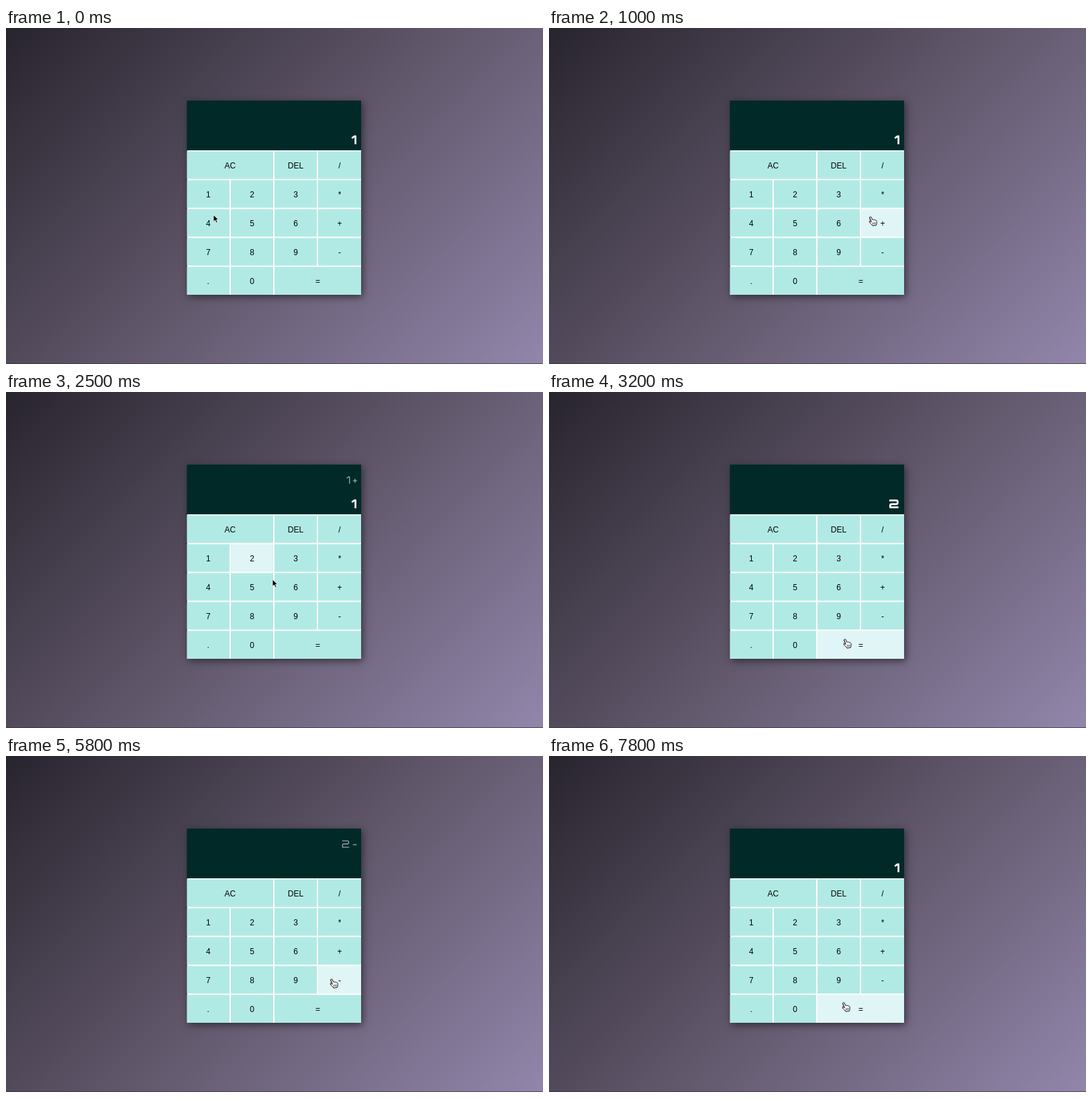
An HTML page that plays this animation: 800x500 px, repeating every 8 s.

```html
<!DOCTYPE html>
<html lang="en">
<head>
<meta charset="utf-8">
<title>Calculator</title>
<style>
  html, body { margin: 0; width: 100%; height: 100%; overflow: hidden; }
  body { background: linear-gradient(135deg, #28242e 0%, #5f5669 50%, #9286ab 100%); }
  svg { position: absolute; left: 0; top: 0; display: block; }
  .panel { position: absolute; left: 269.5px; top: 108px; width: 259.5px; height: 289px;
    background: #fff; box-shadow: 2px 3px 11px rgba(35, 31, 40, .8); }
  .floor { position: absolute; left: 0; top: 499px; width: 100%; height: 1px; background: rgba(55, 50, 60, .7); }
  text { font: 12px "Liberation Sans", Arial, sans-serif; text-anchor: middle; fill: #000; }
  .key { fill: #b1eae4; }
  .key.on { fill: #e0f5f6; }
  .glyph { fill: none; stroke-linejoin: round; }
  .big { stroke: #fff; stroke-width: 2.7; }
  .small { stroke: #b4c3c2; stroke-width: 1.1; }
</style>
</head>
<body>
<div class="panel"></div>
<div class="floor"></div>
<svg width="800" height="500" viewBox="0 0 800 500">
  <rect x="269.5" y="108" width="259.5" height="74" fill="#002927"/>
  <g id="keys"></g>
  <path id="prev" class="glyph small"/>
  <path id="sign" class="glyph small"/>
  <path id="curr" class="glyph big"/>
  <g id="arrow">
    <path d="M0 0V10.2L2.5 8L4.2 12L6.1 11.2L4.4 7.3H7.6Z" fill="#000" stroke="#fff" stroke-width=".8" stroke-linejoin="round"/>
  </g>
  <g id="hand" fill="#fff" stroke="#111" stroke-width="1" stroke-linejoin="round" stroke-linecap="round">
    <path d="M-1.3 1.2C-1.3-.4 .8-.6 1.3 .8L2.6 4.3C3.2 3.6 4.4 3.7 4.8 4.6C5.5 4 6.6 4.2 6.9 5.1C7.9 4.7 8.9 5.3 9 6.4C9.3 8.4 9.4 10.2 8.3 12.6L3 13.2C2.2 11.7 .2 10.2-1.3 8.3C-2.2 7.1-1-.1 .9 7.2Z"/>
    <path d="M-1.3 1.2L.9 7.2C-.5 6.2-2.2 6.7-1.4 8.2" fill="#fff"/>
    <path d="M3.4 8.7V11M5.2 8.6V10.9M7 8.4V10.8" stroke-width=".7"/>
  </g>
</svg>
<script>
const $ = id => document.getElementById(id);
const NS = "http://www.w3.org/2000/svg";
const LOOP = 8000, STEP = 100;

// Column and row edges of the key grid; lines between keys are 2px wide
const cols = [268.5, 334, 399, 464, 530];
const rows = [182.3, 225.5, 268.5, 311.5, 354.5, 398];
const layout = [
  [["AC", 2], ["DEL", 1], ["/", 1]],
  [["1", 1], ["2", 1], ["3", 1], ["*", 1]],
  [["4", 1], ["5", 1], ["6", 1], ["+", 1]],
  [["7", 1], ["8", 1], ["9", 1], ["-", 1]],
  [[".", 1], ["0", 1], ["=", 2]]
];

function add(tag, attrs) {
  const el = document.createElementNS(NS, tag);
  for (const k in attrs) el.setAttribute(k, attrs[k]);
  return $("keys").appendChild(el);
}

const keys = [];
layout.forEach((line, r) => {
  let c = 0;
  for (const [label, span] of line) {
    const x = cols[c] + 1, y = rows[r] + 1;
    const w = cols[c + span] - x - 1, h = rows[r + 1] - y - 1;
    const el = add("rect", { class: "key", x, y, width: w, height: h });
    add("text", { x: x + w / 2, y: y + h / 2 + 4.7 }).textContent = label;
    keys.push({ el, x, y, w, h });
    c += span;
  }
});

// Pointer path: time, x, y
const path = [
  [0, 309, 278], [800, 476, 280], [1000, 479, 281], [1300, 479, 281],
  [1800, 310, 246], [2200, 313, 248], [2400, 375, 264], [2500, 397, 279],
  [2800, 440, 367], [3300, 441, 368], [4000, 485, 289], [4200, 486, 290],
  [4600, 486, 291], [4900, 487, 360], [5200, 487, 360], [5400, 485, 332],
  [5900, 485, 332], [6600, 308, 246], [6900, 310, 248], [7000, 360, 275],
  [7100, 378, 285], [7500, 438, 365], [7800, 439, 367], [8000, 439, 367]
];

// Display: time, stored number, operator, entry
const states = [
  [0, "", "", "1"], [1200, "1", "+", ""], [2000, "1", "+", "1"],
  [3100, "", "", "2"], [4400, "2", "+", ""], [5600, "2", "-", ""],
  [6900, "2", "-", "1"], [7800, "", "", "1"]
];

const big = {
  "": "",
  "1": "M515.2 164L519.2 161.2H520.6V173",
  "2": "M507 161.4H517.2Q519.4 161.4 519.4 163.4V164.8Q519.4 166.8 517.2 166.8H510.4Q508.3 166.8 508.3 168.8V171.7H520.6"
};
const small = {
  "": "",
  "1": "M507.4 128.4L510.4 126.3H511.8V136.4",
  "2": "M500.8 126.3H508.7Q510.5 126.3 510.5 128V129.2Q510.5 130.9 508.7 130.9H503.1Q501.3 130.9 501.3 132.6V135.8H511.3"
};
const signs = { "": "", "+": "M516.8 132H523M519.9 128.9V135.1", "-": "M516.8 132H522.4" };

function pointAt(t) {
  const i = Math.max(1, path.findIndex(p => p[0] >= t));
  const [t0, x0, y0] = path[i - 1], [t1, x1, y1] = path[i];
  const u = (t - t0) / (t1 - t0), e = u * u * (3 - 2 * u);
  return [x0 + (x1 - x0) * e, y0 + (y1 - y0) * e];
}

function keyAt([x, y]) {
  return keys.find(k => x >= k.x && x < k.x + k.w && y >= k.y && y < k.y + k.h);
}

function draw(t) {
  const pos = pointAt(t), under = keyAt(pos);
  // Highlight trails the pointer by one step
  const lit = t < STEP ? undefined : keyAt(pointAt(t - STEP));
  for (const k of keys) k.el.classList.toggle("on", k === lit);

  const isHand = !!lit && lit === under;
  const place = `translate(${pos[0].toFixed(1)} ${pos[1].toFixed(1)})`;
  for (const id of ["hand", "arrow"]) {
    $(id).setAttribute("transform", place);
    $(id).style.display = (id === "hand") === isHand ? "" : "none";
  }

  const [, a, op, b] = states.filter(s => s[0] <= t).pop();
  $("prev").setAttribute("d", small[a]);
  $("sign").setAttribute("d", signs[op]);
  $("curr").setAttribute("d", big[b]);
}

const start = performance.now();
function tick() {
  const t = (performance.now() - start) % LOOP;
  draw(Math.floor(t / STEP) * STEP);
  requestAnimationFrame(tick);
}
tick();
</script>
</body>
</html>
```
